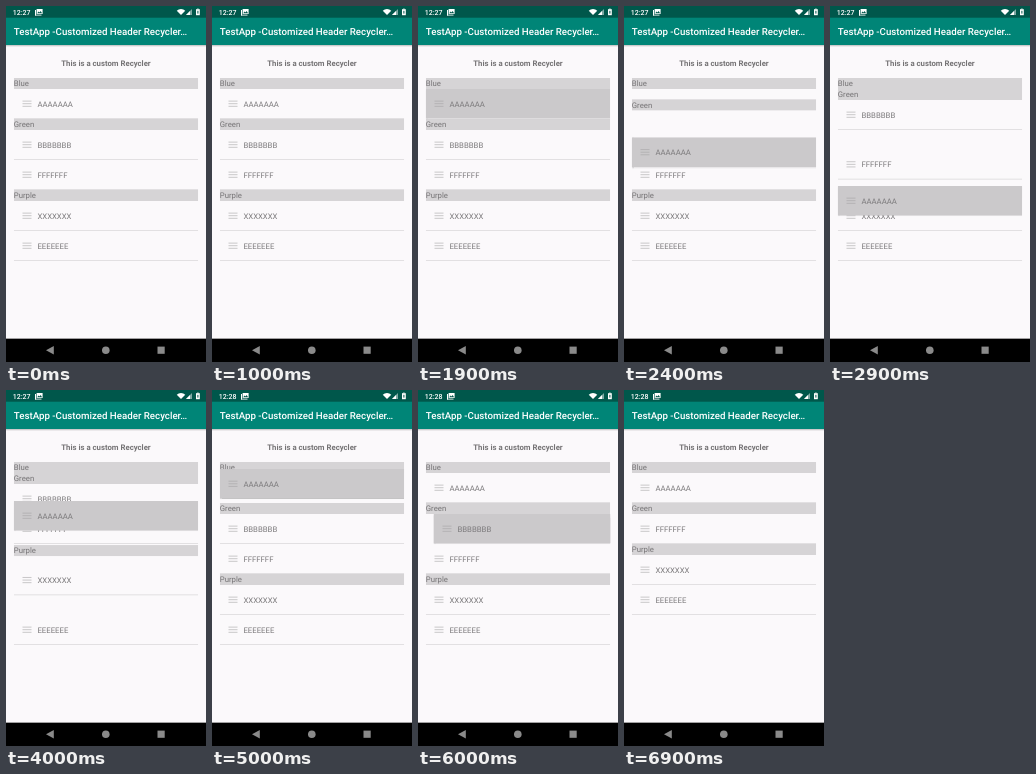
These frames come from a looping animation (200 px wide and 356 px high, 8 s). An HTML page with a canvas:

```html
<!DOCTYPE html>
<html lang="en">
<head>
<meta charset="utf-8">
<title>Draggable list</title>
<style>
html, body { margin: 0; width: 100%; height: 100%; overflow: hidden; background: #fbf9fb; }
canvas { display: block; width: 200px; height: 356px; }
</style>
</head>
<body>
<canvas id="stage"></canvas>
<script>
const W = 200, H = 356, LOOP = 8000, STEP = 100;
const LEFT = 7.8, WIDTH = 184.4, TOP = 72, HEADER = 11, ROW = 30;
const GRAB = 1900, DROP = 5900, SWIPE = 6000, GONE = 6400, CLOSE = 6700;
const canvas = document.getElementById('stage');
const ctx = canvas.getContext('2d');
const dpr = window.devicePixelRatio || 1;
canvas.width = W * dpr;
canvas.height = H * dpr;
ctx.textRendering = 'geometricPrecision';

// The dragged row passes an item at `up` and comes back over it at `down`.
const items = [
  { name: 'Blue', header: true },
  { name: 'A' },
  { name: 'Green', header: true, up: 2250, down: 4250 },
  { name: 'B', up: 2600, down: 4060 },
  { name: 'F', up: 2800, down: 4010 },
  { name: 'Purple', header: true, up: 2850, down: 3970 },
  { name: 'X', up: 2930, down: 3900 },
  { name: 'E' }
];
items.reduce((y, item) => {
  item.home = y;
  return y + (item.header ? HEADER : ROW);
}, TOP);
const [, rowA, , rowB] = items;

// Finger path as [time, top], eased between the points.
const finger = [[GRAB, 83], [2900, 180], [3200, 211], [3500, 220],
  [4000, 111], [4100, 101], [4800, 77], [5300, 83]];

function ease(t, start, length = 250) {
  const p = Math.min(1, Math.max(0, (t - start) / length));
  return (1 - Math.cos(Math.PI * p)) / 2;
}

const follow = (path, t) => path.slice(1).reduce((y, [end, to], i) => {
  const [start, from] = path[i];
  return y + (to - from) * ease(t, start, end - start);
}, path[0][1]);

function topOf(item, t) {
  if (item === rowA) return follow(finger, t);
  let y = item.home;
  if (item.up) y -= ROW * (ease(t, item.up) - ease(t, item.down));
  if (item.home > rowB.home) y -= ROW * ease(t, CLOSE, 200);
  return y;
}

function rect(x, y, w, h, color) {
  ctx.fillStyle = color;
  ctx.fillRect(x, y, w, h);
}

function text(str, x, y, size, color, weight = 400, align = 'left') {
  ctx.font = `${weight} ${size}px Roboto, sans-serif`;
  ctx.textAlign = align;
  ctx.fillStyle = color;
  ctx.fillText(str, x, y);
}

function poly(points, color) {
  ctx.fillStyle = color;
  ctx.beginPath();
  points.forEach(([x, y]) => ctx.lineTo(x, y));
  ctx.fill();
}

function header(item, t) {
  const y = topOf(item, t);
  rect(LEFT, y, WIDTH, HEADER, '#d6d4d6');
  text(item.name, LEFT, y + 8.2, 7.78, '#757375');
}

function row(item, t, x = 0, active = false) {
  const y = topOf(item, t);
  if (active) {
    ctx.save();
    ctx.shadowColor = 'rgba(0,0,0,.25)';
    ctx.shadowBlur = 1.5 * dpr;
    ctx.shadowOffsetY = 0.5 * dpr;
    rect(LEFT + x, y, WIDTH, ROW - 0.5, '#cbc9cb');
    ctx.restore();
  } else {
    rect(LEFT + x, y + ROW - 1, WIDTH, 1, '#e2e0e2');
  }
  for (let i = 0; i < 3; i++) {
    rect(16.5 + x, y + 11.6 + i * 2.6, 9, 1, active ? '#b4b2b4' : '#c9c7c9');
  }
  text(item.name.repeat(7), 31.4 + x, y + 17.6, 7.78, '#7c7a7c');
}

function list(t) {
  const dragging = t >= GRAB && t < DROP;
  ctx.save();
  ctx.beginPath();
  ctx.rect(LEFT, TOP, WIDTH, 260);
  ctx.clip();
  for (const item of items.filter(i => !i.header)) {
    if (item === rowA && dragging || item === rowB && t >= SWIPE) continue;
    ctx.globalAlpha = item.name === 'E' ? 1 - ease(t, GONE - 200, 200) + ease(t, CLOSE, 200) : 1;
    row(item, t);
  }
  ctx.globalAlpha = 1;
  items.filter(i => i.header).forEach(item => header(item, t));
  if (dragging) row(rowA, t, 0, true);
  if (t >= SWIPE && t < GONE) row(rowB, t, 8 + WIDTH * ease(t, SWIPE, GONE - SWIPE), true);
  ctx.restore();
}

function statusBar(t) {
  const dark = '#00574b', white = '#fff';
  rect(0, 0, W, 11.7, dark);
  text(t < 4600 ? '12:27' : '12:28', 6.8, 8.6, 7, white, 500);

  // Picture notification
  rect(29, 4, 1, 5.5, white);
  rect(29, 8.7, 6.5, 0.8, white);
  rect(30.6, 3, 6, 5, white);
  poly([[31.2, 7.3], [32.7, 5.4], [33.6, 6.4], [34.6, 4.9], [36.1, 7.3]], dark);

  // Wi-Fi, signal, battery
  ctx.fillStyle = white;
  ctx.beginPath();
  ctx.moveTo(175, 9);
  ctx.arc(175, 9, 6, -Math.PI * 0.75, -Math.PI * 0.25);
  ctx.fill();
  poly([[180, 9], [186, 9], [186, 3]], '#7fa9a4');
  poly([[180, 9], [184, 9], [184, 5]], white);
  rect(190, 3.2, 3.8, 6, white);
  rect(191.2, 2.6, 1.4, 0.7, white);
  rect(191.4, 4.8, 1, 2.8, dark);
}

function navBar() {
  const gray = '#8a8a8a';
  rect(0, 332.65, W, H - 332.65, '#000');
  poly([[40, 344.2], [47.8, 339.9], [47.8, 348.5]], gray);
  ctx.beginPath();
  ctx.arc(99.8, 344.2, 3.8, 0, Math.PI * 2);
  ctx.fill();
  rect(151.5, 340.6, 7.2, 7.2, gray);
}

function toolbar() {
  rect(0, 39, W, 1, '#cccbcc');
  rect(0, 40, W, 1, '#ebe9eb');
  rect(0, 11, W, 28, '#008577');
  text('TestApp -Customized Header Recycler…', LEFT, 29.2, 9.73, '#fff', 500);
}

function draw(t) {
  ctx.setTransform(dpr, 0, 0, dpr, 0, 0);
  rect(0, 0, W, H, '#fbf9fb');
  toolbar();
  statusBar(t);
  text('This is a custom Recycler', 100, 59.8, 7.78, '#757375', 700, 'center');
  list(t);
  navBar();
}

const start = performance.now();
function tick() {
  const t = (performance.now() - start) % LOOP;
  draw(Math.floor(t / STEP) * STEP);
  requestAnimationFrame(tick);
}
tick();
</script>
</body>
</html>
```
